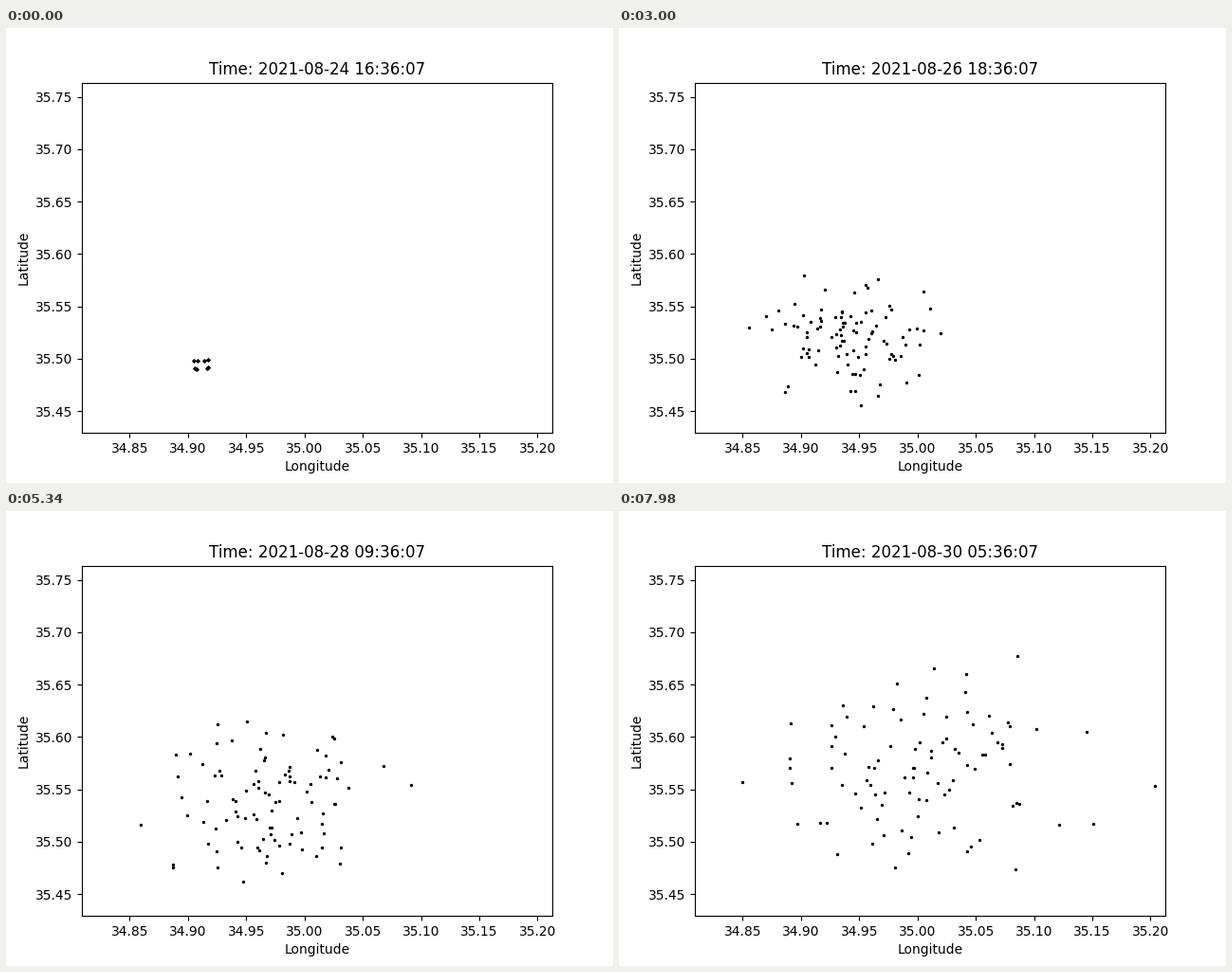
Write a matplotlib script that moves like this. It is 640 by 480 pixels and loops after 8000 ms.

```python
import numpy as np
import matplotlib.pyplot as plt
from matplotlib.animation import FuncAnimation

TICK = 20            # ms per animation call
HOLD = 60            # ms per simulated hour
LOOP = 8000
HOURS = -(-LOOP // HOLD)
PER_POINT = 12       # particles per release point
STEP = (0.0051, 0.0042)   # hourly diffusion in lon, lat degrees

# two rows of four release points
RELEASE = [(34.905, 35.498), (34.9085, 35.498), (34.914, 35.498), (34.9175, 35.499),
           (34.906, 35.491), (34.9075, 35.490), (34.916, 35.491), (34.9175, 35.4915)]


def drift(t):
    """Current carrying the whole cloud: speeding up east, swaying north."""
    east = 0.00055 * t + 1.1e-6 * t ** 2
    north = 0.00052 * t + 0.006 * np.sin(2 * np.pi * t / 100)
    return np.stack([east, north], axis=-1)


def particle_paths(seed):
    """Lon/lat of every particle at every hour."""
    rng = np.random.default_rng(seed)
    first = np.repeat(RELEASE, PER_POINT, axis=0)
    steps = rng.normal(scale=STEP, size=(HOURS, len(first), 2))
    steps[0] = 0
    walk = steps.cumsum(axis=0)
    walk -= walk.mean(axis=1, keepdims=True)
    return first + walk + drift(np.arange(HOURS))[:, None]


paths = particle_paths(seed=24)
begin = np.datetime64("2021-08-24T16:36:07")

fig, ax = plt.subplots(figsize=(6.4, 4.8), dpi=100)
ax.set_xlim(34.80897, 35.21267)
ax.set_ylim(35.42924, 35.76354)
ax.set_xlabel("Longitude")
ax.set_ylabel("Latitude")
dots = ax.scatter(*paths[0].T, s=2, color="black")
title = ax.set_title("")


def update(i):
    hour = i * TICK // HOLD
    dots.set_offsets(paths[hour])
    stamp = str(begin + np.timedelta64(hour, "h")).replace("T", " ")
    title.set_text(f"Time: {stamp}")
    return dots, title


anim = FuncAnimation(fig, update, frames=LOOP // TICK, interval=TICK,
                     init_func=lambda: update(0), repeat=True, repeat_delay=0)
plt.show()
```
